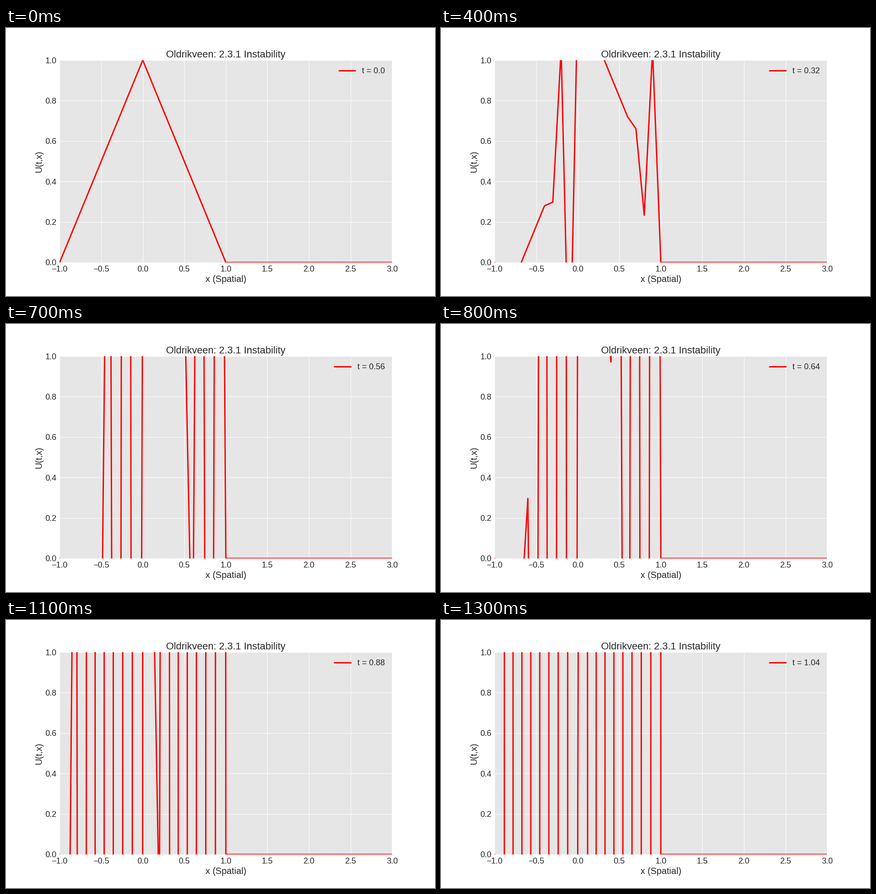
Write a matplotlib script that moves like this. It is 946 px wide and 592 px high and loops after 1400 ms.

```python
import numpy as np
import matplotlib.pyplot as plt
from matplotlib.animation import FuncAnimation

DPI = 64
PX = 72 / DPI  # points per pixel
INK = ".15"
DX, DT, STEPS = 0.1, 0.08, 14

plt.rcParams.update({
    "font.family": "Liberation Sans",
    "text.color": INK,
    "axes.labelcolor": INK,
    "lines.solid_capstyle": "round",
})


def forward_space(u):
    """One forward-time, forward-space step with zero boundaries."""
    new = np.zeros_like(u)
    new[1:-1] = u[1:-1] - DT / DX * (u[2:] - u[1:-1])
    return new


x = np.linspace(-1, 3, 41)
states = [np.maximum(0, 1 - np.abs(x))]
for _ in range(STEPS - 1):
    states.append(forward_space(states[-1]))

fig, ax = plt.subplots(figsize=(946 / DPI, 592 / DPI), dpi=DPI, facecolor="white")
fig.subplots_adjust(left=0.125, right=0.9, bottom=0.125, top=0.88)
ax.set(xlim=(-1, 3), ylim=(0, 1), facecolor=".9", axisbelow=True)
ax.spines[:].set_visible(False)
ax.grid(color="white", linewidth=PX, linestyle="-")
ax.set_xticks(np.arange(-1, 3.1, 0.5))
ax.set_yticks(np.arange(0, 1.1, 0.2))
ax.tick_params(length=0, pad=7 * PX, labelsize=18 * PX, labelcolor=INK)
ax.set_title("Oldrikveen: 2.3.1 Instability", fontsize=22 * PX, pad=6 * PX)
ax.set_xlabel("x (Spatial)", fontsize=20 * PX, labelpad=4 * PX)
ax.set_ylabel("U(t,x)", fontsize=20 * PX, labelpad=4 * PX)

line, = ax.plot(x, states[0], color="red", linewidth=3 * PX, label="t = 0.0")
legend = ax.legend(loc="upper right", frameon=False, fontsize=18 * PX)
time_label = legend.get_texts()[0]


def update(step):
    line.set_ydata(states[step])
    time_label.set_text(f"t = {round(step * DT, 2)}")
    return line, time_label


anim = FuncAnimation(fig, update, frames=STEPS, interval=100, repeat=True)
plt.show()
```
